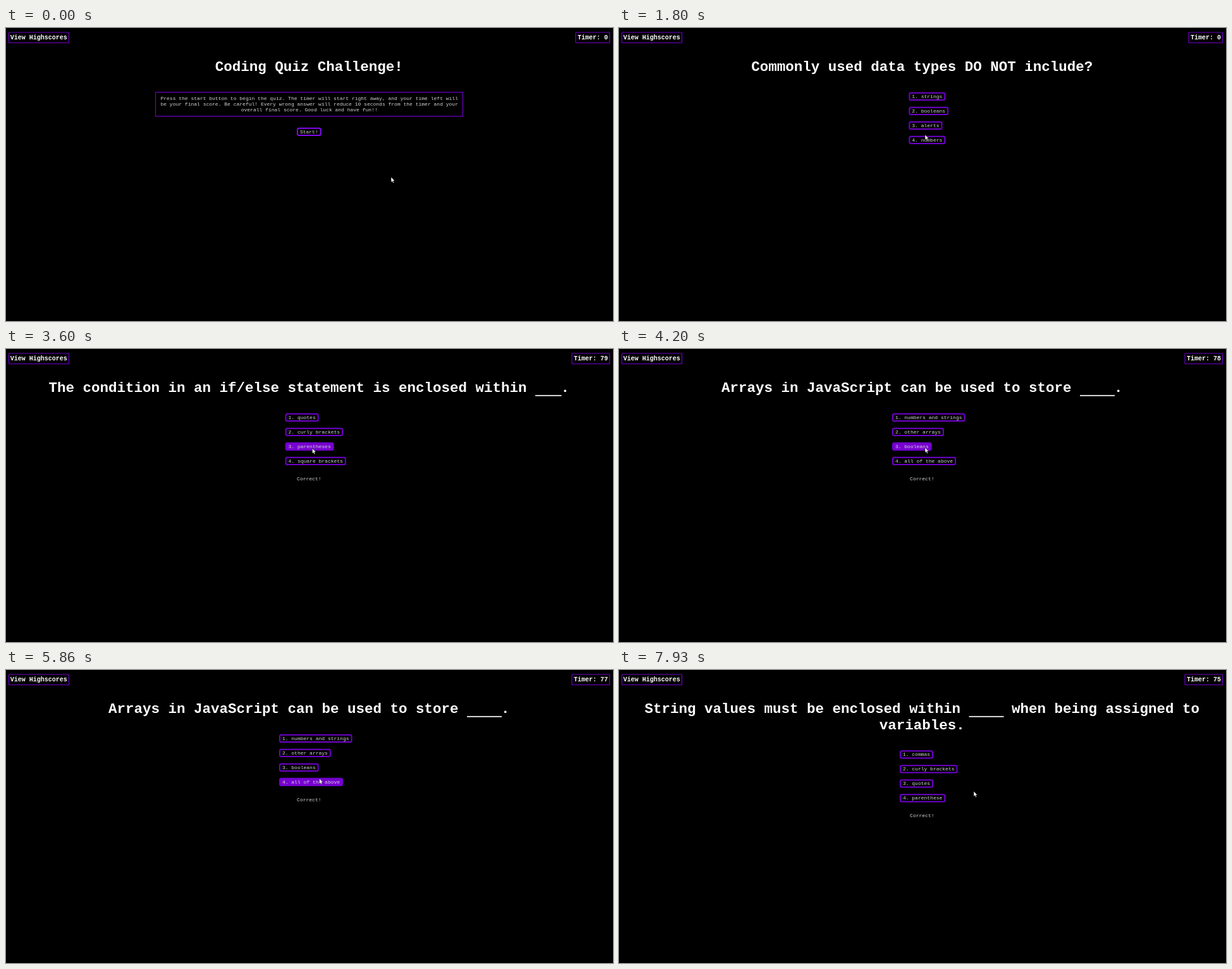
Write an HTML page that moves like this. It is 960x464 px and loops after 8000 ms.

```html
<!DOCTYPE html>
<html lang="en">
<head>
<meta charset="utf-8">
<title>Coding Quiz</title>
<style>
  html, body { margin: 0; width: 100%; height: 100%; overflow: hidden; background: #000; }
  svg { display: block; width: 960px; height: 464px; }
  text { font: 8px "Liberation Mono", "Courier New", monospace; fill: #d4d4d4; white-space: pre; }
  .title { font-size: 22.5px; font-weight: bold; fill: #fff; }
  .head { font-size: 10px; font-weight: bold; fill: #fff; }
  .mid { text-anchor: middle; }
  rect { fill: none; stroke: #7000cc; stroke-width: 1.2; }
  .button { stroke-width: 2; }
  .hover { fill: #7800d0; }
  .start { stroke: #8408f0; }
  .blank { fill: #fff; stroke: none; }
</style>
</head>
<body>
<svg viewBox="0 0 960 464">
  <g id="page"></g>
  <path id="cursor" d="M0 0V8.3L1.9 6.6L3.2 9.6L4.6 9L3.3 6.1H5.8Z" fill="#fff" stroke="#000" stroke-width=".5"/>
</svg>
<script>
const LOOP = 8000, CENTER = 479.3, CHAR = 4.8, TITLE_CHAR = 13.5, LINE = 25.5, ROW = 23;
const FIRST_TICK = 2170, HOVER_TIME = 450;

// Each page opens with a click at its `from` time
const pages = [
  { from: 0, title: ["Coding Quiz Challenge!"] },
  { from: 1170, title: ["Commonly used data types DO NOT include?"],
    answers: ["strings", "booleans", "alerts", "numbers"] },
  { from: 2400, title: ["The condition in an if/else statement is enclosed within ___."],
    answers: ["quotes", "curly brackets", "parentheses", "square brackets"], correct: true },
  { from: 3850, title: ["Arrays in JavaScript can be used to store ____."],
    answers: ["numbers and strings", "other arrays", "booleans", "all of the above"], correct: true },
  { from: 6200, title: ["String values must be enclosed within ____ when being assigned to", "variables."],
    answers: ["commas", "curly brackets", "quotes", "parenthese"], correct: true },
];
const intro = [
  "Press the start button to begin the quiz. The timer will start right away, and your time left will",
  "be your final score. Be careful! Every wrong answer will reduce 10 seconds from the timer and your",
  "overall final score. Good luck and have fun!!",
];

// Where the pointer rests or turns
const stops = [
  { t: 0, x: 609, y: 236 }, { t: 1170, x: 483, y: 165 }, { t: 1800, x: 484, y: 169 },
  { t: 2400, x: 485, y: 156 }, { t: 2860, x: 485, y: 159 }, { t: 4200, x: 484, y: 156 },
  { t: 5130, x: 522, y: 173 }, { t: 6460, x: 476, y: 171 }, { t: 7930, x: 561, y: 192 },
];

function pointerAt(t) {
  const a = stops.filter(s => s.t <= t).pop();
  const b = stops.find(s => s.t > t) || a;
  const u = (t - a.t) / (b.t - a.t || 1), e = u * u * (3 - 2 * u);
  return { x: a.x + (b.x - a.x) * e, y: a.y + (b.y - a.y) * e };
}

const text = (str, x, y, cls = "") => `<text x="${x}" y="${y}" class="${cls}">${str}</text>`;
const box = (x, y, w, h, r = 1, cls = "") =>
  `<rect x="${x}" y="${y}" width="${w}" height="${h}" rx="${r}" class="${cls}"/>`;

// Blanks are drawn as bars below the baseline
function titleLine(str, y) {
  const blank = str.match(/_+/);
  let out = text(str.replace(/_/g, "\u00a0"), CENTER, y, "title mid");
  if (blank) {
    const left = CENTER + (blank.index - str.length / 2) * TITLE_CHAR;
    out += box(left, y + 4.6, blank[0].length * TITLE_CHAR + 1, 1.7, 0, "blank");
  }
  return out;
}

function button(label, x, y, pointer, cls = "") {
  const w = label.length * CHAR + 10, h = 13.2;
  const inside = pointer && pointer.x > x && pointer.x < x + w && pointer.y > y && pointer.y < y + h;
  return box(x + 1, y + 1, w - 2, h - 2, 2.5, `button ${cls} ${inside ? "hover" : ""}`)
    + text(label, x + 5, y + 9);
}

function drawPage(page, timer, pointer) {
  const label = "Timer: " + timer, width = label.length * 6;
  let out = box(4.5, 7, 95, 16.5) + text("View Highscores", 6.7, 18.3, "head")
    + box(949 - width, 7, width + 5.7, 16.5) + text(label, 952 - width, 18.3, "head");
  page.title.forEach((line, i) => out += titleLine(line, 68.3 + i * LINE));

  if (!page.answers) {
    out += box(236.5, 101.8, 486, 38, 0);
    intro.forEach((line, i) => out += text(line, CENTER + .4, 114.4 + i * 9, "mid"));
    return out + button("Start!", 459.9, 157.7, pointer, "start");
  }

  const labels = page.answers.map((answer, i) => `${i + 1}. ${answer}`);
  const widest = Math.max(...labels.map(l => l.length)) * CHAR + 10;
  const top = 101.7 + (page.title.length - 1) * LINE;
  labels.forEach((l, i) => out += button(l, 489.7 - widest / 2, top + i * ROW, pointer));
  if (page.correct) out += text("Correct!", CENTER, top + 106.2, "mid");
  return out;
}

const pageNode = document.getElementById("page");
const cursor = document.getElementById("cursor");
const start = performance.now();
let shown = "";

function frame() {
  const t = Math.max(0, performance.now() - start) % LOOP;
  const page = pages.filter(p => p.from <= t).pop();
  const timer = t < FIRST_TICK ? 0 : 80 - Math.floor((t - FIRST_TICK) / 1000);
  const pointer = pointerAt(t);
  const nearClick = pages.some(p => p.from && Math.abs(t - p.from) < HOVER_TIME);
  const html = drawPage(page, timer, nearClick && pointer);
  if (html !== shown) pageNode.innerHTML = shown = html;
  cursor.setAttribute("transform", `translate(${pointer.x} ${pointer.y})`);
  requestAnimationFrame(frame);
}
frame();
</script>
</body>
</html>
```
